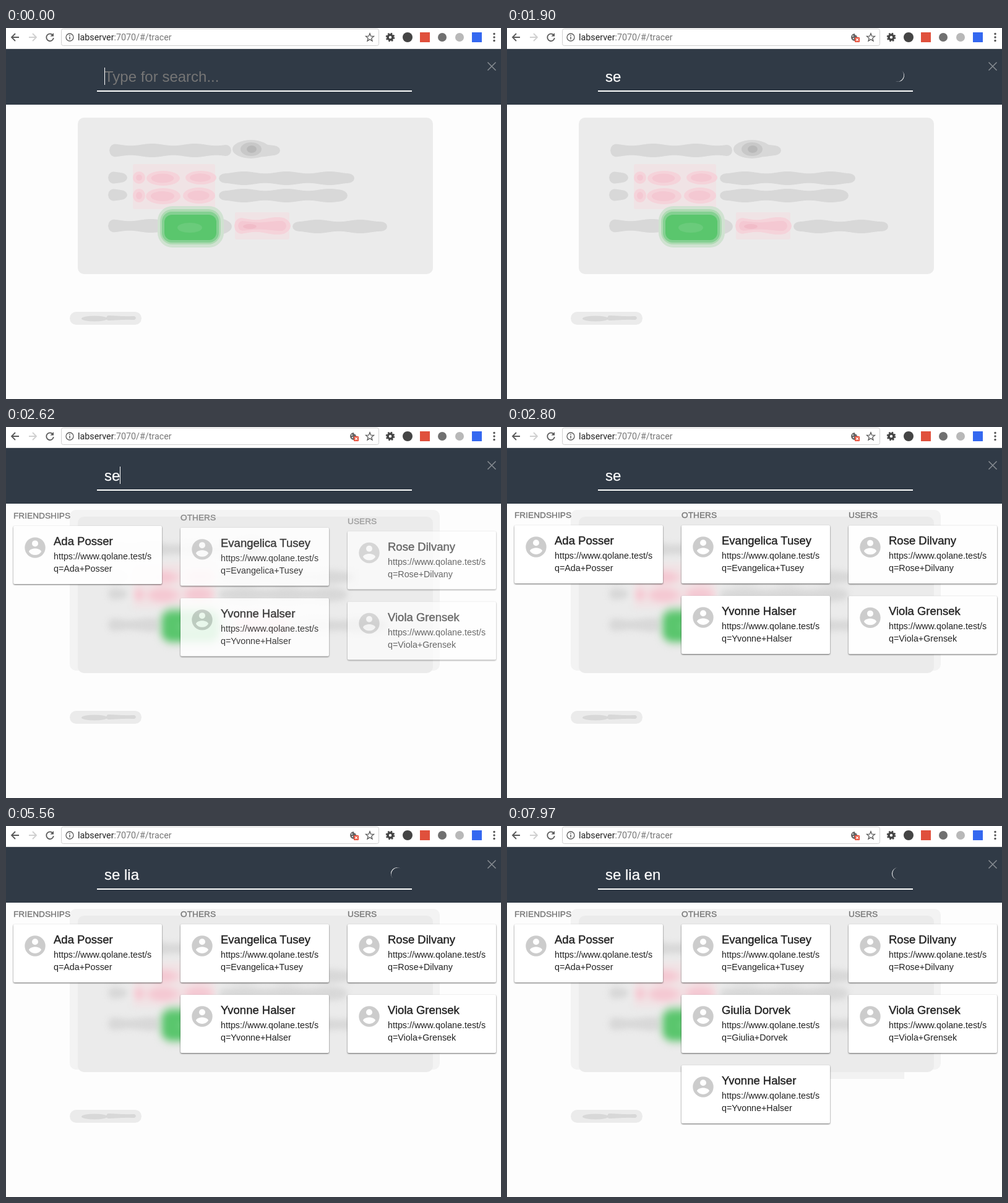
Recreate the animation shown at these times as an HTML page. Size 800 by 600 pixels, loop 8 s.

```html
<!DOCTYPE html>
<html lang="en">
<head>
<meta charset="utf-8">
<title>Search demo</title>
<style>
  html, body { margin: 0; width: 100%; height: 100%; overflow: hidden; background: #fdfdfd; }
  svg { display: block; }
  text { font-family: "Liberation Sans", Arial, sans-serif; white-space: pre; }
  .url { font: 14.3px Roboto, sans-serif; fill: #777; }
  .query { font-size: 24px; }
  #query { fill: #fff; stroke: #fff; stroke-width: .25px; }
  .heading { font-size: 13.7px; fill: #777; stroke: #777; stroke-width: .4px; }
  .name { font-size: 18.5px; fill: #212121; stroke: #212121; stroke-width: .4px; }
  .link { font-size: 14.3px; fill: #212121; }
  .paper { fill: #fff; filter: drop-shadow(0 1px 1.2px rgba(0, 0, 0, .6)); }
  .soft { filter: blur(5px); }
</style>
</head>
<body>
<svg width="800" height="600" viewBox="0 0 800 600">
  <rect width="800" height="600" fill="#fdfdfd"/>
  <rect id="halo" x="103" y="134" width="598" height="260" rx="10" fill="#f3f3f3"/>
  <rect id="lowerHalo" x="282" y="390" width="360" height="19" fill="#f2f2f2"/>
  <rect x="116" y="145" width="574" height="253" rx="10" fill="#ebebeb"/>
  <g id="blobs"></g>
  <g id="pill"></g>
  <g id="results"></g>

  <!-- browser bar -->
  <rect width="800" height="34" fill="#fff"/>
  <rect y="33" width="800" height="1" fill="#e2e2e2"/>
  <rect x="89.5" y="1.5" width="513" height="27" rx="3" fill="#fff" stroke="#cfcfcf"/>
  <g fill="none" stroke="#5a5a5a" stroke-width="1.8">
    <path d="M21 15H9M15 9l-6 6 6 6"/>
    <path d="M37 15h12M43 9l6 6-6 6" stroke="#d0d0d0"/>
    <path d="M75.5 11.5A5.8 5.8 0 1 0 76.8 16"/>
    <path d="M77 8v5.5h-5.5z" fill="#5a5a5a" stroke="none"/>
    <circle cx="103" cy="15" r="6" stroke-width="1.3"/>
    <path d="M103 14v4.5M103 11v1.7" stroke-width="1.5"/>
    <path id="star" stroke-width="1.3"/>
    <circle cx="621" cy="15" r="4" stroke="#444" stroke-width="3.6"/>
    <circle cx="621" cy="15" r="6.3" stroke="#444" stroke-width="2" stroke-dasharray="2.6 2.35"/>
  </g>
  <text class="url" x="116" y="20"><tspan fill="#222">labserver</tspan>:7070/#/tracer</text>
  <g id="cookie">
    <path d="M562 9a6 6 0 1 0 6 6q-3 0-3-3-3 0-3-3z" fill="#666"/>
    <g fill="#fff"><circle cx="559" cy="13" r="1"/><circle cx="560" cy="17" r="1"/></g>
    <rect x="562" y="15" width="8" height="8" rx="1" fill="#e8503a"/>
    <path d="M564 17l4 4m0-4l-4 4" stroke="#fff" stroke-width="1.2"/>
  </g>
  <circle cx="649" cy="15" r="8" fill="#444"/>
  <rect x="669" y="7" width="16" height="16" fill="#e0503c"/>
  <circle cx="705" cy="15" r="7" fill="#707070"/>
  <circle cx="733" cy="15" r="7" fill="#b8b8b8"/>
  <rect x="753" y="7" width="16" height="16" fill="#3468f0"/>
  <g fill="#555"><circle cx="789" cy="9.5" r="1.7"/><circle cx="789" cy="15" r="1.7"/><circle cx="789" cy="20.5" r="1.7"/></g>

  <!-- search header -->
  <rect y="34" width="800" height="90" fill="#303a46"/>
  <rect x="147" y="101" width="509" height="2" fill="#fff"/>
  <path d="M778.5 55.5l13 13m0-13l-13 13" stroke="#888d93" stroke-width="1.5"/>
  <text id="placeholder" class="query" x="159" y="87" fill="#757575">Type for search...</text>
  <text id="query" class="query" x="159" y="87"></text>
  <rect id="caret" y="64" width="1" height="28" fill="#fff"/>
  <path id="spinner" d="M0-10A10 10 0 0 0 0 10A9 10 0 0 1 0-10" fill="#fff"/>
</svg>

<script>
const LOOP = 8000, BLINK = 490, SPIN = 1000;
const KEYS = [[0, ''], [120, 's'], [195, 'se'], [4240, 'se '], [4440, 'se l'], [4640, 'se li'],
  [4840, 'se lia'], [6790, 'se lia '], [7040, 'se lia e'], [7300, 'se lia en']];
const LOADING = [[323, 2330], [4443, 5920], [6970, LOOP]];
const COOKIE_AT = 1330, RESULTS_AT = 2335, STAGGER = 70, ENTER = 380, RISE = 28;
const UPDATE_AT = 5940, ROW = 114;

const el = id => document.getElementById(id);
const show = (node, on) => node.setAttribute('visibility', on ? 'visible' : 'hidden');

// Wavy bar with round ends, h is its half height
function blob(x0, x1, y, h, fill, phase = 0) {
  const top = [], bottom = [];
  for (let x = x0; x <= x1; x++) {
    const end = Math.min(x - x0, x1 - x, h);
    const round = Math.sqrt(1 - (1 - end / h) ** 2);
    const half = h * round * (.85 + .15 * Math.cos((x - x0) / 11 + phase));
    top.push(`${x} ${(y - half).toFixed(1)}`);
    bottom.unshift(`${x} ${(y + half).toFixed(1)}`);
  }
  return `<path d="M${top.concat(bottom).join('L')}Z" fill="${fill}"/>`;
}
const oval = (x, y, rx, ry, fill) => `<ellipse cx="${x}" cy="${y}" rx="${rx}" ry="${ry}" fill="${fill}"/>`;
const box = (x, y, w, h, r, fill) => `<rect x="${x}" y="${y}" width="${w}" height="${h}" rx="${r}" fill="${fill}"/>`;

const GRAY = '#d8d8d8', BLUSH = '#f0e3e5', PINK = '#f5d3da', ROSE = '#f4c8d2';
const spot = (x, y, rx, ry) => oval(x, y, rx, ry, PINK) + oval(x - 1, y, rx * .68, ry * .62, ROSE);

el('blobs').innerHTML = [
  blob(167, 364, 198, 11, GRAY), blob(405, 443, 198, 11, GRAY),
  oval(396, 196, 30, 15, GRAY), oval(396, 196, 17, 11, '#c8c8c8'), oval(397, 196, 8, 6, '#b8b8b8'),
  box(205, 220, 133, 73, 3, BLUSH), box(370, 298, 88, 44, 3, BLUSH),
  blob(165, 196, 242, 10, GRAY), blob(344, 563, 243, 11, GRAY, 2.6),
  blob(165, 196, 270, 10, GRAY), blob(344, 552, 271, 11, GRAY, 2.6),
  oval(215, 242, 10, 10, PINK), oval(215, 242, 5, 5, ROSE), spot(254, 243, 27, 12), spot(315, 242, 25, 11),
  oval(215, 271, 10, 11, PINK), oval(215, 271, 5, 6, ROSE), spot(254, 272, 28, 13), spot(312, 271, 26, 13),
  blob(165, 260, 320, 11, GRAY), blob(330, 365, 321, 15, GRAY),
  blob(463, 616, 321, 11, GRAY, 2.6),
  blob(369, 460, 320, 14, PINK), blob(375, 453, 320, 8, ROSE), oval(394, 321, 11, 4, '#f1bcc8'),
  box(245, 288, 107, 67, 24, '#d0e2d1'), box(249, 293, 98, 57, 20, '#aedab3'),
  box(252, 297, 92, 50, 16, '#85d092'), box(256, 302, 84, 41, 12, '#5ac66d'),
  oval(297, 323, 20, 8, '#6acb7b')
].join('');
el('pill').innerHTML = box(103, 459, 116, 21, 10.5, '#ebebeb') + oval(143, 470, 21, 4.5, GRAY) + blob(162, 210, 469, 4, GRAY);

el('star').setAttribute('d', 'M' + Array.from({ length: 10 }, (_, i) => {
  const a = i * Math.PI / 5, r = i % 2 ? 2.9 : 6.8;
  return `${588 + r * Math.sin(a)} ${15.5 - r * Math.cos(a)}`;
}).join('L') + 'Z');

const card = name => `<g>
  <rect class="paper" width="240" height="94" rx="2"/>
  <circle cx="35" cy="35" r="16.7" fill="#ccc"/>
  <circle cx="35" cy="28.3" r="5" fill="#fff"/>
  <path d="M35 47c-4.2 0-7.9-2.1-10-5.4 0-3.3 6.7-5.1 10-5.1s10 1.8 10 5.1c-2.1 3.3-5.8 5.4-10 5.4z" fill="#fff"/>
  <text class="name" x="65" y="31">${name}</text>
  <text class="link" x="65" y="54">https://www.qolane.test/s</text>
  <text class="link" x="65" y="74">q=${name.replace(' ', '+')}</text></g>`;

const COLUMNS = [
  ['FRIENDSHIPS', 'Ada Posser'],
  ['OTHERS', 'Evangelica Tusey', 'Yvonne Halser', 'Giulia Dorvek'],
  ['USERS', 'Rose Dilvany', 'Viola Grensek']
];
el('results').innerHTML = COLUMNS.map(([title, ...names]) =>
  `<g><text class="heading" y="147">${title}</text>${names.map(card).join('')}</g>`).join('');
const columns = [...el('results').children];
const cards = columns.map(column => [...column.querySelectorAll('g')]);
const [, shifted, added] = cards[1];

// CSS "ease", cubic-bezier(.25, .1, .25, 1)
function ease(x) {
  if (x <= 0) return 0;
  if (x >= 1) return 1;
  const curve = (a, b, s) => 3 * a * s * (1 - s) ** 2 + 3 * b * s * s * (1 - s) + s ** 3;
  let lo = 0, hi = 1;
  for (let i = 0; i < 16; i++) {
    const mid = (lo + hi) / 2;
    if (curve(.25, .25, mid) < x) lo = mid; else hi = mid;
  }
  return curve(.1, 1, lo);
}

function place(node, x, y, opacity = 1) {
  node.setAttribute('transform', `translate(${x} ${y})`);
  node.setAttribute('opacity', opacity);
}

function drawInput(t) {
  const [typedAt, text] = KEYS.filter(([at]) => at <= t).pop();
  const query = el('query');
  query.textContent = text;
  show(el('placeholder'), !text);
  const width = text ? query.getComputedTextLength() : 0;
  el('caret').setAttribute('x', Math.floor(159 + width));
  show(el('caret'), Math.floor((t - typedAt) / BLINK) % 2 === 0);

  const span = LOADING.find(([from, to]) => t >= from && t < to);
  show(el('spinner'), span);
  if (span) el('spinner').setAttribute('transform', `translate(632 77) rotate(${(t - span[0]) / SPIN * 360})`);
}

function drawResults(t) {
  const entered = t >= RESULTS_AT;
  show(el('halo'), entered);
  show(el('lowerHalo'), t >= UPDATE_AT);
  el('blobs').classList.toggle('soft', entered);
  columns.forEach((column, i) => {
    const p = ease((t - RESULTS_AT - i * STAGGER) / ENTER);
    place(column, 12 + 270 * i, RISE * (1 - p), p);
    cards[i].forEach((node, row) => place(node, 0, 159 + ROW * row));
  });
  const p = ease((t - UPDATE_AT) / ENTER);
  place(shifted, 0, 159 + ROW * (1 + p));
  place(added, 0, 159 + ROW + RISE * (1 - p), p);
}

function frame(now) {
  const t = now % LOOP;
  drawInput(t);
  drawResults(t);
  show(el('cookie'), t >= COOKIE_AT);
  requestAnimationFrame(() => frame(performance.now() - start));
}
const start = performance.now();
frame(0);
</script>
</body>
</html>
```
